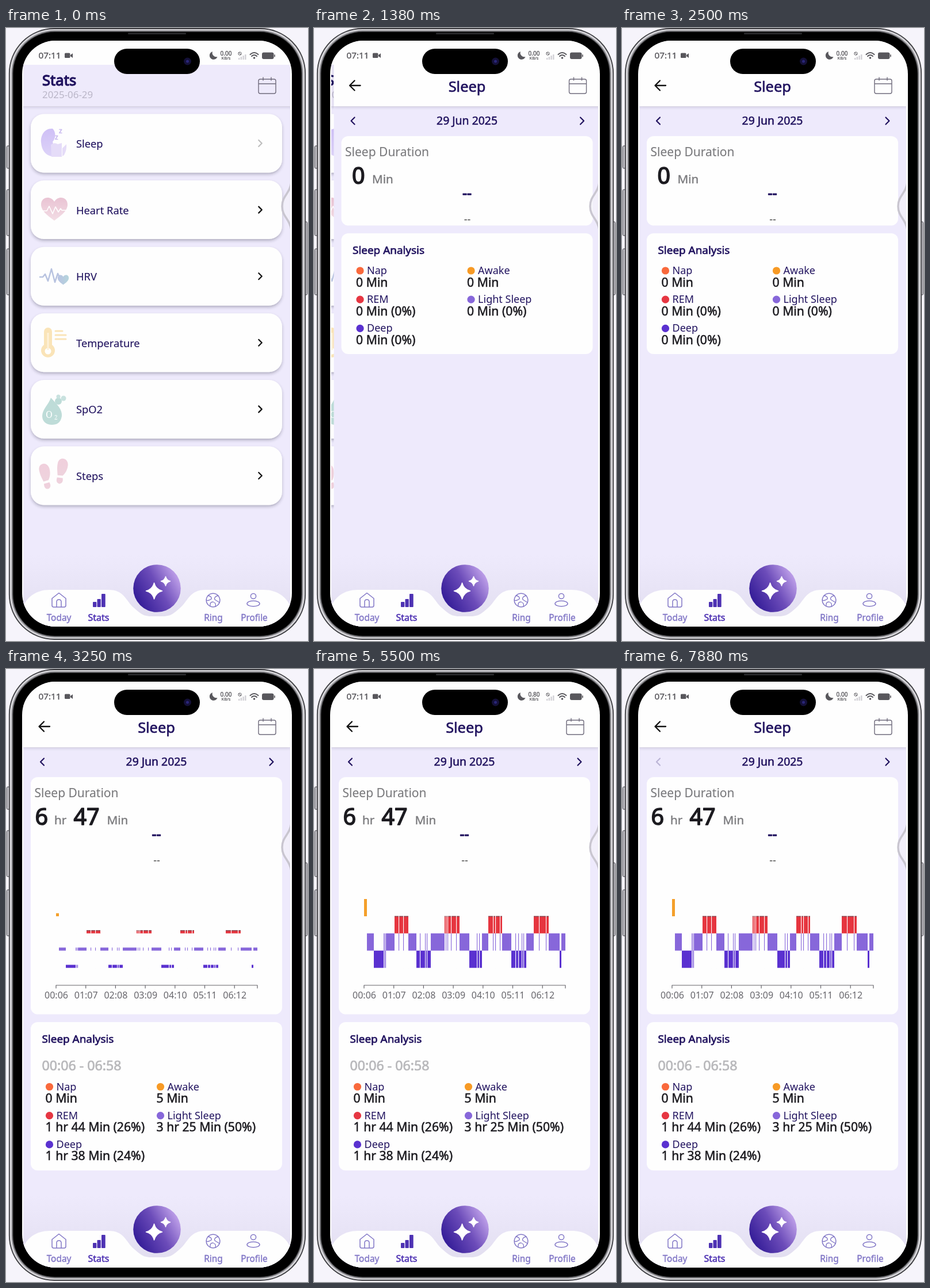
Animation of 525 by 1066 pixels, one loop 8 s. Source, as an HTML page:

```html
<!DOCTYPE html>
<html lang="en">
<head>
<meta charset="utf-8">
<title>Sleep stats</title>
<style>
html, body { margin: 0; width: 100%; height: 100%; overflow: hidden; background: #f6f4fb; }
svg { display: block; width: 100%; height: 100%; font-family: "Noto Sans", "Open Sans", sans-serif; }
text { stroke-linejoin: round; }
.line { fill: none; stroke-linecap: round; stroke-linejoin: round; }
</style>
</head>
<body>
<svg id="stage" viewBox="0 0 525 1066"></svg>
<script>
const INK = '#21135f', PURPLE = '#8176c6', DARK = '#1c1b20', GRAY = '#58575c';
const LOOP = 8000, OPEN = 1210, LOADED = 3100, GROW = 860;

// Weights between regular and bold are made with a thin outline.
const text = (x, y, size, str, fill = INK, weight = 400, more = '') =>
  `<text x="${x}" y="${y}" font-size="${size}" fill="${fill}" stroke="${fill}"
    stroke-width="${size * (weight - 400) / 5000}" ${more}>${str}</text>`;
const mid = (x, y, size, str, fill, weight) => text(x, y, size, str, fill, weight, 'text-anchor="middle"');
const rect = (x, y, w, h, fill, r = 0, more = '') =>
  `<rect x="${x}" y="${y}" width="${w}" height="${h}" rx="${r}" fill="${fill}" ${more}/>`;
const dot = (x, y, r, fill, more = '') => `<circle cx="${x}" cy="${y}" r="${r}" fill="${fill}" ${more}/>`;
const line = (d, color, width = 1.5, more = '') =>
  `<path class="line" d="${d}" stroke="${color}" stroke-width="${width}" ${more}/>`;
const fill = (d, color, more = '') => `<path d="${d}" fill="${color}" ${more}/>`;
const group = (body, more = '') => `<g ${more}>${body}</g>`;
const chevron = (x, y, dir, color, size = 5, more = '') =>
  line(`M${x - dir * size / 2} ${y - size}l${dir * size} ${size}l${-dir * size} ${size}`, color, 2.2, more);
const heart = (x, y, s, color) => fill('M0 20C-10 12-23 4-23-8C-23-22-6-24 0-13C6-24 23-22 23-8C23 4 10 12 0 20Z',
  color, `transform="translate(${x} ${y}) scale(${s})"`);
const star = (x, y, r) => {
  const k = r * .2;
  return fill(`M${x} ${y - r}Q${x + k} ${y - k} ${x + r} ${y}Q${x + k} ${y + k} ${x} ${y + r}` +
    `Q${x - k} ${y + k} ${x - r} ${y}Q${x - k} ${y - k} ${x} ${y - r}Z`, '#fff',
    'stroke="#fff" stroke-width="1.5" stroke-linejoin="round"');
};

const gradient = (id, a, b, dir = 'x2="0" y2="1"', middle = '') =>
  `<linearGradient id="${id}" ${dir}><stop stop-color="${a}"/>${middle}<stop offset="1" stop-color="${b}"/></linearGradient>`;
const shadow = (id, dy, blur, opacity) =>
  `<filter id="${id}" x="-10%" y="-10%" width="120%" height="130%">
    <feDropShadow dx="0" dy="${dy}" stdDeviation="${blur}" flood-color="#2a2540" flood-opacity="${opacity}"/></filter>`;
const defs = `<defs>
  ${gradient('pink', '#e9c3d3', '#f3dde5')}${gradient('blue', '#b9c3e3', '#b5d5dc', '')}
  ${gradient('moon', '#cfc0f6', '#ddd3f8')}${gradient('foot', '#f0cfdc', '#eed3dd')}
  ${gradient('fade', '#e3dff200', '#e0dced')}
  ${gradient('ball', '#38209a', '#c3a5ec', 'x1=".05" y1=".65" x2=".92" y2=".15"', '<stop offset=".5" stop-color="#6c4cb9"/>')}
  ${shadow('cardShadow', 3, 2.5, .3)}${shadow('barShadow', 2, 2.5, .16)}
  <clipPath id="screen">${rect(28, 22, 469, 1019, '#000', 58)}</clipPath>
  <clipPath id="content">${rect(30, 64, 464, 977, '#000')}</clipPath>
</defs>`;

const button = (x, y, h) => rect(x, y, 5, h, '#c9c8cf', 1.5, 'stroke="#3c3c40"');
const phone = [[1.5, 205, 39], [1.5, 281, 80], [1.5, 384, 80], [518.5, 337, 127]].map(b => button(...b)).join('') +
  rect(5.8, 1, 514.4, 1062, '#d9d8dc', 78, 'stroke="#3c3c40" stroke-width="1.8"') +
  rect(9.5, 4, 507, 1056, '#9a999e', 75) + rect(11, 5.5, 504, 1053, '#4a4a4d', 74) +
  rect(12.5, 7, 501, 1050, '#000', 72) +
  rect(212, 8.5, 101, 2.5, '#2d2d30', 1) +
  rect(28, 22, 469, 1019, '#fefefe', 58);

const calendar = line('M442 89H466Q469 89 469 92V111Q469 114 466 114H442Q439 114 439 111V92Q439 89 442 89Z' +
  'M439 97H469M447 86V91M461 86V91', '#6f6b7c', 1.4);

const footprint = (x, y, angle) => group(
  fill('M-9-9C-9-21 7-22 9-9C10 0 7 7 4 11L-5 12C-7 4-9 0-9-9Z', 'url(#foot)') +
  fill('M-5 16L5 15Q8 24 1 26Q-6 26-5 16Z', 'url(#foot)'), `transform="translate(${x} ${y}) rotate(${angle})"`);

const icons = [
  fill('M81 175C66 174 60 188 61 199C62 213 69 221 79 223V208C82 207 83 203 81 198C88 190 86 180 81 175Z', 'url(#moon)') +
    fill('M78 203Q84 198 90 202L97 200V224H79ZM98 209L105 202Q106 212 101 221L98 223Z', '#e5dcf8') +
    text(85, 194, 12, 'z', '#c9bbef', 700) + text(92, 183, 12, 'z', '#c9bbef', 700),
  heart(84, 315, 1, 'url(#pink)') +
    line('M62 318H71L75 310L81 323L86 311L91 320L95 314L97 317H106', '#fff', 1.6),
  line('M59 433H64L68 428L73 440L79 419L85 442L90 427L93 433', '#b8c3e0', 2.5) + heart(99.5, 438, .42, 'url(#blue)'),
  fill('M66 528A7 7 0 0 1 80 528V551A12 12 0 1 1 66 551Z', '#fae4b8') + dot(73, 562, 5.5, '#fff') +
    rect(71.5, 530, 3, 30, '#fdf1da') + line('M86 527H98M86 534H104M86 541H104', '#fae4b8', 3),
  fill('M78 643C89 655 98 663 97 675C95 687 88 690 80 690C70 690 63 684 63 675C63 663 74 655 78 643Z', '#bedcd8') +
    dot(91, 649, 6, '#bedcd8') + dot(91, 641, 3.5, '#c9e2df') + dot(100, 644, 4.5, '#c9e2df') +
    `<g font-family="Noto Serif, serif">${text(69, 678, 16, 'O', '#fff')}${text(84, 681, 10, '2', '#fff')}</g>`,
  footprint(68, 776, -10) + footprint(97, 767, 12)
];

const rows = ['Sleep', 'Heart Rate', 'HRV', 'Temperature', 'SpO2', 'Steps'];
const statsPage = rect(-30, 64, 600, 980, '#eeeafc') +
  rect(-30, 40, 600, 96, '#eeeafb', 0, 'filter="url(#barShadow)"') +
  text(63, 99.5, 25.6, 'Stats', INK, 650) + text(63, 122, 16.9, '2025-06-29', '#bab6c8') + calendar +
  rows.map((name, i) => {
    const y = 149.5 + i * 115.6;
    return rect(43, y, 437, 102, '#fefefe', 23, 'filter="url(#cardShadow)"') +
      text(122, y + 58.5, 18.3, name, INK, 430) + chevron(442, y + 51, 1, '#111', 5.5, i ? '' : 'id="rowArrow"');
  }).join('') + icons.join('');

// Sleep stages along the chart: letter and starting x; blips are short returns to light sleep.
const stages = 'A87 L92 D104 L125 R140 L165 D178 L203 R227 L253 D270 L292 R303 L327 D343 L369 R382 L408 D427 L430 L437'
  .split(' ').map(s => [s[0], +s.slice(1)]);
const blips = [121, 123, 147, 155, 164, 184, 193, 196, 229, 232, 238, 247, 283, 287, 311, 315, 323, 350, 355, 361, 364, 391, 403];
const look = { A: [430, '#f4a02b'], R: [459.7, '#e6353f'], L: [489.7, '#8767da'], D: [519.7, '#5a31d0'] };

function bars(p) {
  const h = 30 * p;
  const bar = (kind, x, w) => rect(x, look[kind][0] - h, w, h, look[kind][1]);
  const body = stages.slice(0, -1).map(([kind, x], i) => {
    const w = stages[i + 1][1] - x;
    return bar(kind, x, w) + (kind === 'R' ? rect(x, look.R[0] - h, w, 1, '#5d4a55') : '');
  }).join('');
  const gaps = blips.map(x => rect(x, 429, 1.1, 30.7, '#fefefe') + rect(x, 489.7, 1.1, 31, '#fefefe') + bar('L', x, 1.1));
  return body + gaps.join('');
}

const axis = line('M87 555V550H437V555' + [1, 2, 3, 4, 5, 6].map(i => `M${87 + i * 51.7} 550v5`).join(''), '#66656b', 1.2) +
  ['00:06', '01:07', '02:08', '03:09', '04:10', '05:11', '06:12']
    .map((s, i) => mid(87.5 + i * 51.7, 573, 16, s, '#66656b')).join('');

const legend = (y, values) => [['Nap', '#f9693c'], ['Awake', '#f79a25'], ['REM', '#e63642'],
  ['Light Sleep', '#8767da'], ['Deep', '#5a31d0']].map(([name, color], i) => {
    const x = i % 2 * 193, top = y + (i >> 1) * 50.2;
    return dot(75.5 + x, top, 6.6, color) + text(87.5 + x, top + 6, 18, name) +
      text(68.5 + x, top + 27.5, 21.2, values[i], DARK, 530);
  }).join('');
const card = (y, h) => rect(43, y, 437, h, '#fefefe', 12);
const dashes = mid(261.5, 296, 25, '--', INK, 650) + mid(262, 339, 18, '--', '#444');
const duration = text(49.5, 223, 21, 'Sleep Duration', '#7b7b7e', 430);
const number = (x, s) => text(x, 270.5, 39.5, s, DARK, 600);
const unit = (x, s) => text(x, 269.5, 20.6, s, '#7b7b7e', 500);
const heading = y => text(62.5, y, 18.9, 'Sleep Analysis', INK, 580);

const emptyBody = card(188, 155.5) + card(357, 210) + duration + number(61.5, '0') + unit(96.5, 'Min') + dashes +
  heading(393) + legend(422, ['0 Min', '0 Min', '0 Min (0%)', '0 Min (0%)', '0 Min (0%)']);
const fullBody = card(188, 412.5) + card(614, 258) + duration +
  number(50.5, '6') + unit(84, 'hr') + number(117.5, '47') + unit(175.5, 'Min') + dashes +
  '<g id="bars"></g>' + axis + heading(650) + text(62.5, 698, 23.2, '00:06 - 06:58', '#b8b8bb', 560) +
  legend(726.5, ['0 Min', '5 Min', '1 hr 44 Min (26%)', '3 hr 25 Min (50%)', '1 hr 38 Min (24%)']);

const sleepPage = rect(30, 64, 464, 980, '#eeeafc') +
  rect(30, 40, 464, 96, '#fefefe', 0, 'filter="url(#barShadow)"') +
  line('M76 100H58M66 91.5L57.5 100L66 108.5', '#111', 2.3) + mid(261.5, 110.5, 25.4, 'Sleep', INK, 530) + calendar +
  chevron(63, 161.5, -1, INK, 6, 'id="prevDay"') + chevron(461.5, 161.5, 1, INK, 6) +
  mid(261.5, 168, 19.4, '29 Jun 2025', INK, 540) +
  group(emptyBody, 'id="empty"') + group(fullBody, 'id="full"');

const bulge = 'M496 268C494 288 480 291 480 310C480 329 494 332 496 352';
const handle = fill(bulge + 'Z', '#f4f2fa', 'fill-opacity=".7"') + line(bulge, '#c9c6d0', 3.5);

const nav = rect(30, 915, 464, 126, 'url(#fade)') +
  fill('M28 1041V1012C34 990 52 977 76 977H178C206 977 208 996 222 1008C234 1019 240 1023 252 1023H273' +
    'C285 1023 291 1019 303 1008C317 996 319 977 347 977H448C472 977 490 990 497 1012V1041Z', '#fefefe') +
  dot(262.5, 974.5, 41.3, 'url(#ball)') + star(257.5, 979, 14) + star(277.5, 962, 8) +
  line('M80 992L92 982.5L104 992V1004Q104 1007 101 1007H83Q80 1007 80 1004ZM88 1007V998Q88 994 92 994Q96 994 96 998V1007', PURPLE) +
  rect(151, 998, 6.3, 9, '#4e32b3', 1) + rect(158.5, 993, 6.3, 14, '#4e32b3', 1) + rect(166, 984, 6.7, 23, '#4e32b3', 1) +
  dot(360, 995, 11.8, 'none', `stroke="${PURPLE}" stroke-width="1.5"`) +
  line('M351 987Q358 988 357 993Q350 997 349 995M369 987Q361 989 363 994L371 999M355 1005Q354 998 360 998Q366 1000 364 1006', PURPLE, 1.3) +
  dot(430, 988, 4.6, 'none', `stroke="${PURPLE}" stroke-width="1.5"`) +
  `<ellipse cx="430" cy="1001" rx="11" ry="4.8" fill="none" stroke="${PURPLE}" stroke-width="1.5"/>` +
  mid(92, 1031, 15.4, 'Today', PURPLE, 530) + mid(161, 1031, 16, 'Stats', '#4e32b3', 570) +
  mid(360.5, 1031, 15.4, 'Ring', PURPLE, 530) + mid(431.5, 1031, 15.4, 'Profile', PURPLE, 530);

const status = rect(28, 22, 469, 42, '#fefefe') + text(56.5, 53, 15.3, '07:11', GRAY, 520) +
  rect(102, 43.5, 9.5, 8.5, GRAY, 1.5) + fill('M112 47L116 44V52L112 49Z', GRAY) +
  fill('M359 41A7 7 0 1 0 367.5 50A7 7 0 0 1 359 41Z', GRAY) +
  mid(382.5, 47.5, 10, '<tspan id="speed">0.00</tspan>', GRAY, 560) + mid(382.5, 54.5, 7.5, 'KB/s', GRAY, 560) +
  dot(406.5, 44.5, 2.7, 'none', `stroke="${GRAY}"`) + line('M404.7 42.7l3.6 3.6', GRAY, 1) +
  [0, 1, 2, 3].map(i => rect(404 + i * 3.7, 52 - i * 2, 2.4, 3 + i * 2, '#d2d1d6')).join('') +
  line('M424.5 46Q431.5 39.5 438.5 46M427 49Q431.5 45 436 49', GRAY, 2) + dot(431.5, 52, 1.8, GRAY) +
  rect(445, 42.5, 20.5, 11.5, GRAY, 3) + rect(466.2, 46, 1.6, 4.5, GRAY, .8);
const island = rect(188, 36, 149, 44, '#000', 22) + dot(315.5, 58, 6.5, '#141038') + dot(315.5, 58, 2.5, '#2a2678');

const stage = document.getElementById('stage');
stage.innerHTML = defs + phone + group(
  group(group(statsPage, 'id="stats"') + group(sleepPage, 'id="sleep"') + handle, 'clip-path="url(#content)"') +
  nav + status, 'clip-path="url(#screen)"') + island;

const $ = id => document.getElementById(id);
const clamp = v => Math.max(0, Math.min(1, v));
const cubic = (a, b, c, d, u) => a * (1 - u) ** 3 + 3 * b * u * (1 - u) ** 2 + 3 * c * u * u * (1 - u) + d * u ** 3;

// Two-part curve: quick start, very slow settling.
function settle(x) {
  const [xs, ys] = x < 1 / 6 ? [[0, .05, .1333, 1 / 6], [0, 0, .06, .4]] : [[1 / 6, .2083, .25, 1], [.4, .82, 1, 1]];
  let lo = 0, hi = 1;
  for (let i = 0; i < 24; i++) {
    const u = (lo + hi) / 2;
    if (cubic(...xs, u) < x) lo = u; else hi = u;
  }
  return cubic(...ys, lo);
}

const show = (id, on) => $(id).setAttribute('display', on ? 'inline' : 'none');
let grown = -1;

function draw(now) {
  const t = now % LOOP, since = t - OPEN;
  const p = settle(clamp(since / 450));
  $('stats').setAttribute('transform', `translate(${-46.4 * p} 0)`);
  $('sleep').setAttribute('transform', `translate(${46.4 * (1 - p)} 0)`);
  $('sleep').setAttribute('opacity', clamp((since - 50) / 83));
  show('stats', since < 450);
  show('empty', t < LOADED);
  show('full', t >= LOADED);
  $('rowArrow').setAttribute('opacity', t < 500 ? .27 : 1);
  $('prevDay').setAttribute('opacity', 1 - .75 * clamp((t - 7500) / 130));
  $('speed').textContent = t >= 3500 && t < 6500 ? '0.80' : '0.00';
  const g = clamp((t - LOADED) / GROW);
  if (g !== grown) $('bars').innerHTML = bars(grown = g);
  requestAnimationFrame(draw);
}
requestAnimationFrame(draw);
</script>
</body>
</html>
```
